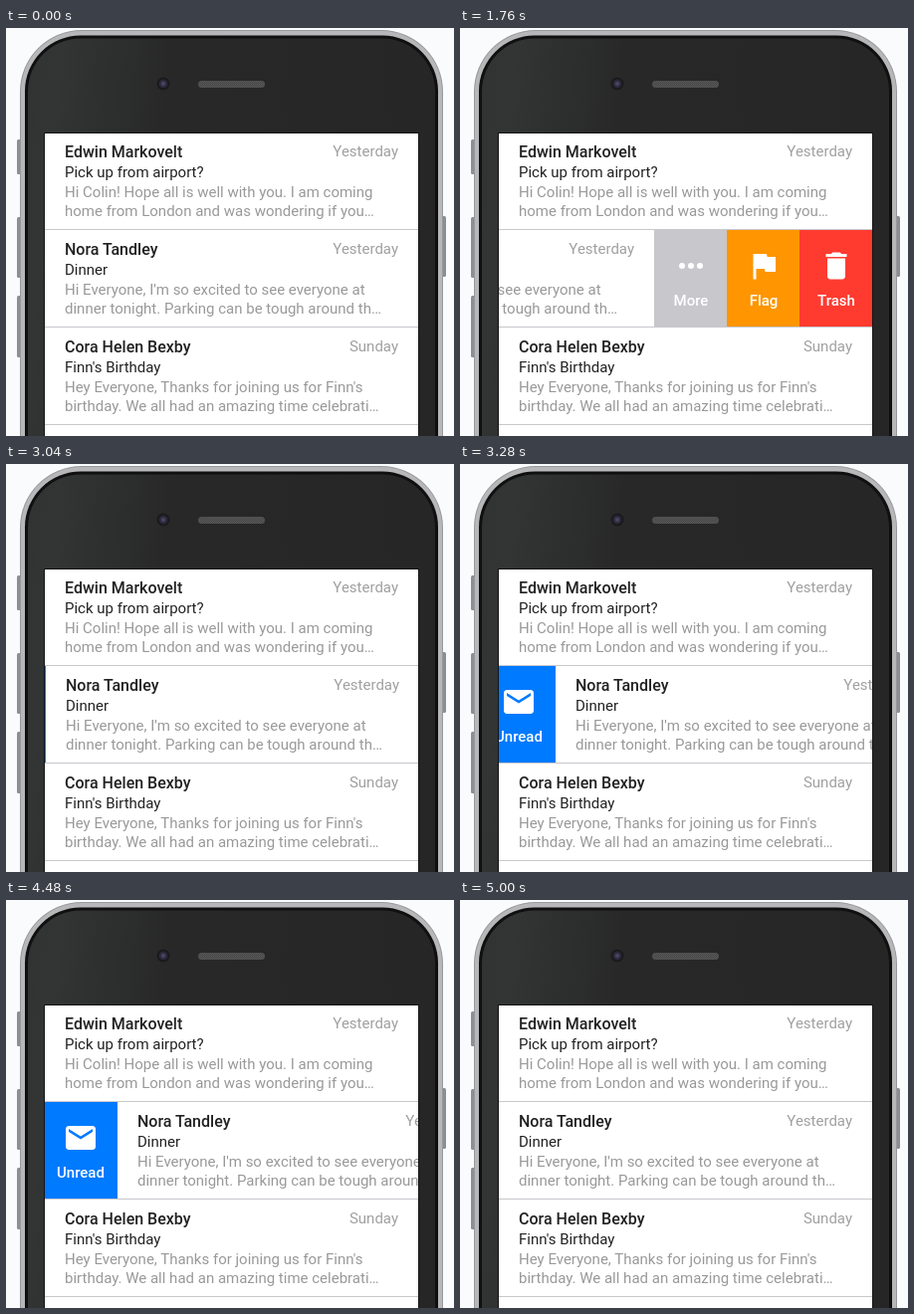
Recreate the animation shown at these times as an HTML page. Size 450x410 px, loop 5.8 s.

```html
<!DOCTYPE html>
<html lang="en">
<head>
<meta charset="utf-8">
<title>Swipe actions</title>
<style>
  html, body { margin: 0; width: 100%; height: 100%; overflow: hidden; background: #fafbfc; }
  svg { display: block; }
  text { font: 15px Roboto, sans-serif; fill: #222; }
  .name { font-size: 16px; font-weight: 500; }
  .soft { fill: #999; }
  .date { fill: #a0a0a0; text-anchor: end; }
  .label { fill: #fff; font-weight: 500; text-anchor: middle; }
</style>
</head>
<body>
<svg width="450" height="410" viewBox="0 0 450 410">
  <defs>
    <linearGradient id="face" x1="0" y1="0" x2="1" y2="0.15">
      <stop offset="0" stop-color="#303332"/>
      <stop offset="0.08" stop-color="#323534"/>
      <stop offset="0.35" stop-color="#282828"/>
      <stop offset="1" stop-color="#262626"/>
    </linearGradient>
    <pattern id="mesh" width="2" height="2" patternUnits="userSpaceOnUse">
      <rect width="2" height="2" fill="#484848"/>
      <path d="M0 0h1v1h-1zM1 1h1v1h-1z" fill="#575757"/>
    </pattern>
    <clipPath id="screen"><rect x="39" y="106" width="375" height="304"/></clipPath>
    <clipPath id="slot"><rect x="39" y="203" width="375" height="97"/></clipPath>
  </defs>

  <g fill="#8b8e94">
    <rect x="11" y="112" width="6" height="35" rx="1.5"/>
    <rect x="11" y="190" width="6" height="61" rx="1.5"/>
    <rect x="11" y="269" width="6" height="62" rx="1.5"/>
    <rect x="436" y="189" width="6" height="61" rx="1.5"/>
  </g>
  <rect x="14" y="2" width="425" height="600" rx="62" fill="#98999b"/>
  <rect x="15" y="3" width="423" height="600" rx="61" fill="#b7b7b9"/>
  <rect x="19" y="7.5" width="415" height="600" rx="56" fill="#0f0f10"/>
  <rect x="22" y="10.5" width="409" height="600" rx="53" fill="url(#face)"/>
  <circle cx="158" cy="56" r="6.5" fill="#1a1a1f"/>
  <circle cx="158" cy="56" r="4.3" fill="#2b2b38"/>
  <circle cx="158" cy="56" r="2.2" fill="#4d3f63"/>
  <rect x="193" y="53" width="67" height="7" rx="3.5" fill="url(#mesh)"/>

  <rect x="38" y="105" width="377" height="305" fill="#151515"/>
  <rect x="39" y="106" width="375" height="304" fill="#fff"/>
  <g id="list" clip-path="url(#screen)"></g>
</svg>

<script>
const LEFT = 39, RIGHT = 414, BTN = 74, LOOP = 5800, TICK = 20;

const mails = [
  ["Edwin Markovelt", "Yesterday", "Pick up from airport?",
   "Hi Colin! Hope all is well with you. I am coming",
   "home from London and was wondering if you…"],
  ["Nora Tandley", "Yesterday", "Dinner",
   "Hi Everyone, I'm so excited to see everyone at",
   "dinner tonight. Parking can be tough around th…"],
  ["Cora Helen Bexby", "Sunday", "Finn's Birthday",
   "Hey Everyone, Thanks for joining us for Finn's",
   "birthday. We all had an amazing time celebrati…"]
];

const icons = {
  More: "M4 12a2 2 0 1 0 4 0a2 2 0 1 0-4 0M10 12a2 2 0 1 0 4 0a2 2 0 1 0-4 0M16 12a2 2 0 1 0 4 0a2 2 0 1 0-4 0",
  Flag: "M14.4 6L14 4H5v17h2v-7h5.6l.4 2h7V6z",
  Trash: "M6 19c0 1.1.9 2 2 2h8c1.1 0 2-.9 2-2V7H6zM19 4h-3.5l-1-1h-5l-1 1H5v2h14z",
  Unread: "M20 4H4c-1.1 0-2 .9-2 2v12c0 1.1.9 2 2 2h16c1.1 0 2-.9 2-2V6c0-1.1-.9-2-2-2zm0 4l-8 5-8-5V6l8 5 8-5z"
};

// start, end, from, to, x of the second easing handle
const moves = [
  [545, 1100, 0, -3 * BTN, 0.196],
  [1745, 2300, -3 * BTN, 0, 0.382],
  [3025, 3600, 0, BTN, 0.2],
  [4465, 5000, BTN, 0, 0.04]
];

function add(parent, tag, attrs, text = "") {
  const el = document.createElementNS("http://www.w3.org/2000/svg", tag);
  for (const key in attrs) el.setAttribute(key, attrs[key]);
  el.textContent = text;
  return parent.appendChild(el);
}

function addMail(parent, top, [name, date, subject, line1, line2]) {
  add(parent, "rect", { x: LEFT, y: top, width: RIGHT - LEFT, height: 97, fill: "#fff" });
  const put = (cls, x, y, text) => add(parent, "text", { class: cls, x, y: top + y }, text);
  put("name", 59, 25, name);
  put("date", 394, 24, date);
  put("subject", 59, 45, subject);
  put("soft", 59, 65, line1);
  put("soft", 59, 84, line2);
}

function addButton(parent, name, fill, width) {
  const g = add(parent, "g", {});
  add(g, "rect", { y: 203, width, height: 97, fill });
  add(g, "path", { d: icons[name], fill: "#fff", transform: `translate(${BTN / 2 - 18} 221) scale(1.5)` });
  add(g, "text", { class: "label", x: BTN / 2, y: 279 }, name);
  return g;
}

const list = document.getElementById("list");
const slot = add(list, "g", { "clip-path": "url(#slot)" });
const actions = [
  addButton(slot, "More", "#c7c7cc", 3 * BTN),
  addButton(slot, "Flag", "#ff9500", 2 * BTN),
  addButton(slot, "Trash", "#ff3b30", BTN)
];
const unread = addButton(slot, "Unread", "#007aff", BTN);
const row = add(slot, "g", {});

mails.forEach((mail, i) => {
  const top = 105 + 98 * i;
  addMail(i === 1 ? row : list, top, mail);
  add(list, "rect", { x: LEFT, y: top + 97, width: RIGHT - LEFT, height: 1, fill: "#c8c7cc" });
});

// cubic-bezier(.25, .1, x2, 1)
function ease(x, x2) {
  const curve = (s, a, b) => 3 * a * s * (1 - s) ** 2 + 3 * b * s * s * (1 - s) + s ** 3;
  let lo = 0, hi = 1;
  for (let i = 0; i < 24; i++) {
    const mid = (lo + hi) / 2;
    if (curve(mid, 0.25, x2) < x) lo = mid; else hi = mid;
  }
  return curve(lo, 0.1, 1);
}

function offsetAt(t) {
  for (const [start, end, from, to, x2] of moves) {
    if (t >= start && t < end) return from + (to - from) * ease((t - start) / (end - start), x2);
  }
  const done = moves.filter(m => t >= m[1]).pop();
  return done ? done[3] : 0;
}

const moveTo = (el, x) => el.setAttribute("transform", `translate(${x} 0)`);

function draw(ms) {
  const t = Math.floor((ms % LOOP) / TICK) * TICK;
  const dx = Math.round(offsetAt(t));
  moveTo(row, dx);
  moveTo(unread, LEFT - BTN + Math.max(dx, 0));
  actions.forEach((el, i) => moveTo(el, RIGHT + Math.min(dx, 0) * (3 - i) / 3));
}

const begin = performance.now();
function frame() {
  draw(performance.now() - begin);
  requestAnimationFrame(frame);
}
frame();
</script>
</body>
</html>
```
